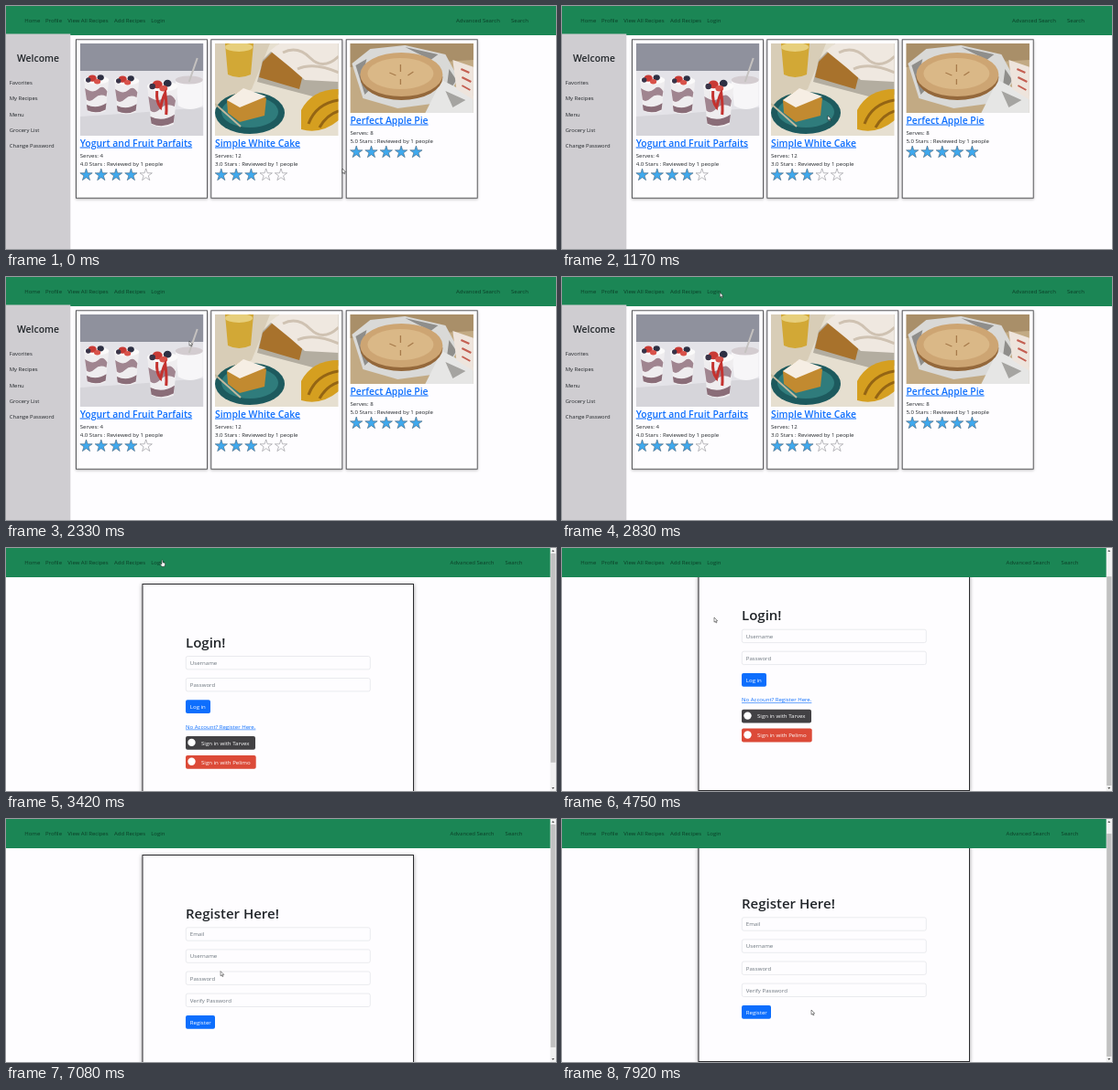
Recreate the animation shown at these times as an HTML page. Size 600 px wide and 266 px high, loop 8 s.

```html
<!DOCTYPE html>
<html lang="en">
<head>
<meta charset="utf-8">
<title>Recipe site</title>
<style>
html, body { margin: 0; width: 100%; height: 100%; overflow: hidden; background: #fefdff; }
svg { display: block; width: 100vw; height: 100vh; }
text { font-family: "Open Sans", "Noto Sans", sans-serif; fill: #212529; white-space: pre; }
.head { font-weight: 600; }
.link { fill: #0d6efd; text-decoration: underline; }
.nav text { fill: #0b3d26; }
.card { fill: #fefdff; stroke: #2b2b2e; filter: drop-shadow(0 1px 2px #0006); }
#home .card { stroke: #4a4a4e; stroke-width: .9; filter: drop-shadow(.5px 1.5px 1.5px #0004); }
.hint { fill: #6c757d; }
.light { fill: #fff; }
</style>
</head>
<body>
<svg id="stage" viewBox="0 0 600 266"></svg>
<script>
const LOOP = 8000, LOGIN_AT = 3420, REGISTER_AT = 6830;
const LOGIN_SCROLL = 29.3, REGISTER_SCROLL = 11;

const text = (x, y, size, str, cls = '') =>
  `<text x="${x}" y="${y}" font-size="${size}" class="${cls}">${str}</text>`;
const rect = (x, y, w, h, fill, extra = '') =>
  `<rect x="${x}" y="${y}" width="${w}" height="${h}" fill="${fill}" ${extra}/>`;
const oval = (x, y, rx, ry, fill, extra = '') =>
  `<ellipse cx="${x}" cy="${y}" rx="${rx}" ry="${ry}" fill="${fill}" ${extra}/>`;
const path = (d, fill, extra = '') => `<path d="${d}" fill="${fill}" ${extra}/>`;
const frame = (x, y, w, h) => `<rect class="card" x="${x}" y="${y}" width="${w}" height="${h}"/>`;

function star(cx, cy, full) {
  const points = Array.from({ length: 10 }, (_, i) => {
    const r = i % 2 ? 2.7 : 7, a = i * Math.PI / 5;
    return `${(cx + r * Math.sin(a)).toFixed(2)},${(cy - r * Math.cos(a)).toFixed(2)}`;
  });
  return `<polygon points="${points.join(' ')}" fill="${full ? '#3fa9ee' : '#fefdff'}"
    stroke="${full ? '#46627a' : '#8d8d92'}" stroke-width=".6"/>`;
}

// Photos are drawn in a box 135 wide, with its origin at the top left.
function cup(x, y, scale) {
  return `<g transform="translate(${x} ${y}) scale(${scale})">` +
    path('M-15 0 L-11 38 Q0 43 11 38 L15 0 Z', '#efedef') +
    path('M-14 10 Q-4 17 2 11 T13 14 L12 20 Q4 16 -2 22 T-12 24Z', '#a08590') +
    path('M-12 30 Q0 36 12 28 L11 36 Q0 42 -11 37Z', '#8a6d78') +
    oval(0, 0, 15, 5, '#fbfafa') +
    oval(-5, -2, 5, 4, '#c93a35') + oval(5, -3, 4, 3.5, '#2d2f43') +
    oval(1, 2, 4, 3, '#d8524a') + oval(-10, 0, 3, 3, '#3a3448') + '</g>';
}
const parfaits =
  rect(0, 0, 135, 101, '#e4e3e8') + rect(0, 0, 135, 30, '#8f919d') +
  path('M0 101 L0 80 L60 76 L135 70 V101Z', '#d6d5da') +
  path('M104 40 H134 V68 Q120 76 107 68Z', '#f7f6f8') + oval(119, 40, 15, 4.5, '#d3ccd0') +
  path('M119 42 L128 16', 'none', 'stroke="#c5c2c0" stroke-width="2"') +
  cup(18, 40, .9) + cup(51, 41, .9) + cup(90, 47, 1.1) +
  path('M84 52 q-1 12 4 18 q2 -10 5 -16 q2 16 1 24', 'none', 'stroke="#c4322f" stroke-width="3"');

const whiteCake =
  rect(0, 0, 135, 101, '#e6dfd0') + path('M0 0 H60 L40 50 L0 70Z', '#d8cdb7') +
  path('M11 0 H42 L39 34 Q26 40 14 34Z', '#d2a836') + oval(26, 4, 15, 5, '#e7cf7c') +
  path('M52 18 L70 0 H135 V56 L122 62 L46 42Z', '#b3ada0') +
  path('M52 20 L66 6 L96 34 L92 50 L48 37Z', '#a8722c') +
  path('M60 8 L70 0 H135 V42 L98 40 L82 26Z', '#efe8e0') +
  path('M74 10 Q90 2 104 16 T135 14 M90 28 Q108 20 135 32', 'none', 'stroke="#cfc2b2" stroke-width="3"') +
  path('M94 73 Q106 50 135 50 V84 Q116 100 94 94Z', '#d59f20') +
  path('M102 88 Q110 66 135 62 M114 92 Q122 78 135 74', 'none', 'stroke="#946514" stroke-width="3"') +
  oval(38, 76, 38, 23, '#1d5a5e') + oval(38, 75, 31, 17, '#2f7c7c') +
  path('M13 62 L30 50 L56 60 L54 79 L27 86 L14 76Z', '#c28a30') +
  path('M13 62 L31 49 L56 58 L27 70Z', '#f6eee4') +
  path('M0 66 L28 91', 'none', 'stroke="#c4b99d" stroke-width="2"');

const applePie =
  rect(0, 0, 135, 76, '#c2aa84') + path('M0 0 H135 V18 L0 26Z', '#a98f69') +
  path('M2 22 L22 6 L60 2 L104 12 L118 38 L104 64 L52 71 L14 60Z', '#d9d9d7') +
  path('M6 24 L18 17 L14 34 L24 48 L16 56Z M60 4 L96 12 L88 18Z M108 28 L116 40 L104 58Z', '#8f8e8b') +
  path('M100 40 L135 58 V76 H82Z', '#e6e6e5') + path('M104 52 L126 62 L112 70Z', '#a5a4a1') +
  path('M112 18 L135 26 V62 L116 50Z', '#eee4dc') +
  path('M121 28 l9 4 M122 37 l10 5 M122 46 l9 5', 'none', 'stroke="#c45f52" stroke-width="2"') +
  oval(56, 37, 45, 25, '#94683b') + oval(56, 34, 45, 24, '#cda573') +
  oval(55, 33, 36, 17, '#dab887') +
  path('M55 23 v8 M43 32 l7 3 M69 31 l-6 4 M55 39 v6', 'none', 'stroke="#a77b4b" stroke-width="1.3"');

function recipeCard(x, photo, photoHeight, title, serves, rating) {
  const y = 41 + photoHeight;
  return frame(x + .5, 36.8, 143, 173.4) +
    `<svg x="${x + 4.7}" y="41" width="134.5" height="${photoHeight}">${photo}</svg>` +
    text(x + 4.7, y + 11.5, 10.4, title, 'head link') +
    text(x + 4.7, y + 23.7, 6.1, `Serves: ${serves}`) +
    text(x + 4.7, y + 33, 6.1, `${rating}.0 Stars : Reviewed by 1 people`) +
    [0, 1, 2, 3, 4].map(i => star(x + 11.5 + i * 16.3, y + 43, i < rating)).join('');
}

const field = (y, label) =>
  rect(196.3, y - 7.2, 201, 14.4, '#fefdff', 'rx="2" stroke="#dcdde3" stroke-width=".6"') +
  text(200.8, y + 2.3, 6.1, label, 'hint');
const button = (y, w, fill, label, indent = 4.8) =>
  rect(196, y - 7.4, w, 14.8, fill, 'rx="2"') + text(196 + indent, y + 2.4, 6.1, label, 'light');
const signIn = (y, w, fill, label) =>
  button(y, w, fill, label, 17) + oval(202.5, y - .5, 4.2, 4.2, '#fff');

const home =
  rect(0, 30.5, 70.3, 236, '#cfcdd1') + text(12, 60.5, 10.4, 'Welcome', 'head') +
  ['Favorites', 'My Recipes', 'Menu', 'Grocery List', 'Change Password']
    .map((label, i) => text(3.8, 86.2 + i * 17.2, 5.9, label)).join('') +
  recipeCard(76, parfaits, 101, 'Yogurt and Fruit Parfaits', 4, 4) +
  recipeCard(223.3, whiteCake, 101, 'Simple White Cake', 12, 3) +
  recipeCard(370.7, applePie, 76, 'Perfect Apple Pie', 8, 5);

const login = frame(149, 39.5, 295.5, 255.3) +
  text(196, 108.7, 15, 'Login!', 'head') +
  field(125.7, 'Username') + field(149.7, 'Password') +
  button(173.6, 27, '#0d6efd', 'Log in') +
  text(196, 197.6, 6.05, 'No Account? Register Here.', 'link') +
  signIn(213.4, 76, '#424144', 'Sign in with Tarvex') +
  signIn(234.3, 76.7, '#dc4a38', 'Sign in with Pelimo');

const register = frame(149, 39.5, 295.5, 237) +
  text(196, 108.7, 15, 'Register Here!', 'head') +
  ['Email', 'Username', 'Password', 'Verify Password']
    .map((label, i) => field(126 + i * 24.1, label)).join('') +
  button(222.3, 32, '#0d6efd', 'Register');

const nav = rect(0, 0, 600, 32, '#1b8655') +
  [[20.3, 'Home'], [43, 'Profile'], [67.3, 'View All Recipes'], [118, 'Add Recipes'], [158.2, 'Login']]
    .map(([x, label]) => text(x, 18, 6, label)).join('') +
  `<g id="navRight">${text(491, 18, 6, 'Advanced Search')}${text(551, 18, 6, 'Search')}</g>`;

const scrollbar = rect(593.7, 0, 6.3, 266, '#f1f1f1') +
  path('M595.3 4 l1.5 -2 l1.5 2Z M595.3 262 l1.5 2 l1.5 -2Z', '#555') +
  rect(594.2, 6, 5.3, 226, '#c1c1c1', 'id="thumb"');

const pointer = 'stroke="#222" stroke-width=".5" stroke-linejoin="round"';
const $ = id => document.getElementById(id);

// The sidebar overlaps the navigation bar; the scrolling pages pass under it.
$('stage').innerHTML = `
  <g id="login">${login}</g><g id="register">${register}</g>
  <g class="nav">${nav}</g><g id="home">${home}</g><g id="scrollbar">${scrollbar}</g>
  <g id="cursor">
    ${path('M0 0 V5.2 L1.2 4.1 L2 6 L2.9 5.6 L2.1 3.8 H3.7Z', '#fff', pointer + ' id="arrow"')}
    ${path('M-.6 0 Q0 -.6 .5 0 V2.3 L3 3 V5 L2.3 6.8 H-.6 L-2.2 4.2 L-1.5 3.6 L-.6 4.4Z', '#fff', pointer + ' id="hand"')}
  </g>`;

const ease = p => p * p * (3 - 2 * p);
const progress = (t, from, to) => ease(Math.min(1, Math.max(0, (t - from) / (to - from))));

// Cursor stops: time, x, y
const stops = [
  [330, 367, 178], [1170, 290, 120], [1920, 215, 95], [2330, 200, 70], [2920, 170.5, 13.5],
  [4000, 170.5, 13.5], [4400, 166, 76], [4750, 166, 76], [5500, 234, 200], [6000, 230, 162],
  [7000, 230, 162], [7420, 272, 209]
];

function cursorAt(t) {
  const i = stops.findIndex(s => s[0] > t);
  if (i === 0) return stops[0].slice(1);
  if (i < 0) return stops.at(-1).slice(1);
  const [t0, x0, y0] = stops[i - 1], [t1, x1, y1] = stops[i];
  const p = progress(t, t0, t1);
  return [x0 + (x1 - x0) * p, y0 + (y1 - y0) * p];
}

const show = (id, on) => $(id).setAttribute('display', on ? 'inline' : 'none');
const move = (id, x, y) => $(id).setAttribute('transform', `translate(${x} ${y})`);

function draw(now) {
  const t = now % LOOP;
  const page = t < LOGIN_AT ? 'home' : t < REGISTER_AT ? 'login' : 'register';
  for (const id of ['home', 'login', 'register']) show(id, id === page);

  const range = page === 'register' ? REGISTER_SCROLL : LOGIN_SCROLL;
  const scroll = page === 'home' ? 0
    : page === 'login' ? range * progress(t, 4200, 4580)
    : range * progress(t, 7560, 7900);
  if (page !== 'home') move(page, 0, -scroll);

  const ratio = 254 / (266 + range);
  show('scrollbar', page !== 'home');
  $('thumb').setAttribute('y', 6 + scroll * ratio);
  $('thumb').setAttribute('height', 266 * ratio);
  move('navRight', page === 'home' ? 0 : -6.4, 0);

  const [x, y] = cursorAt(t);
  const overLink = (t > 2850 && t < 4060) || (t > 5950 && t < REGISTER_AT);
  move('cursor', x, y);
  show('arrow', !overLink);
  show('hand', overLink);
  requestAnimationFrame(draw);
}
requestAnimationFrame(draw);
</script>
</body>
</html>
```
